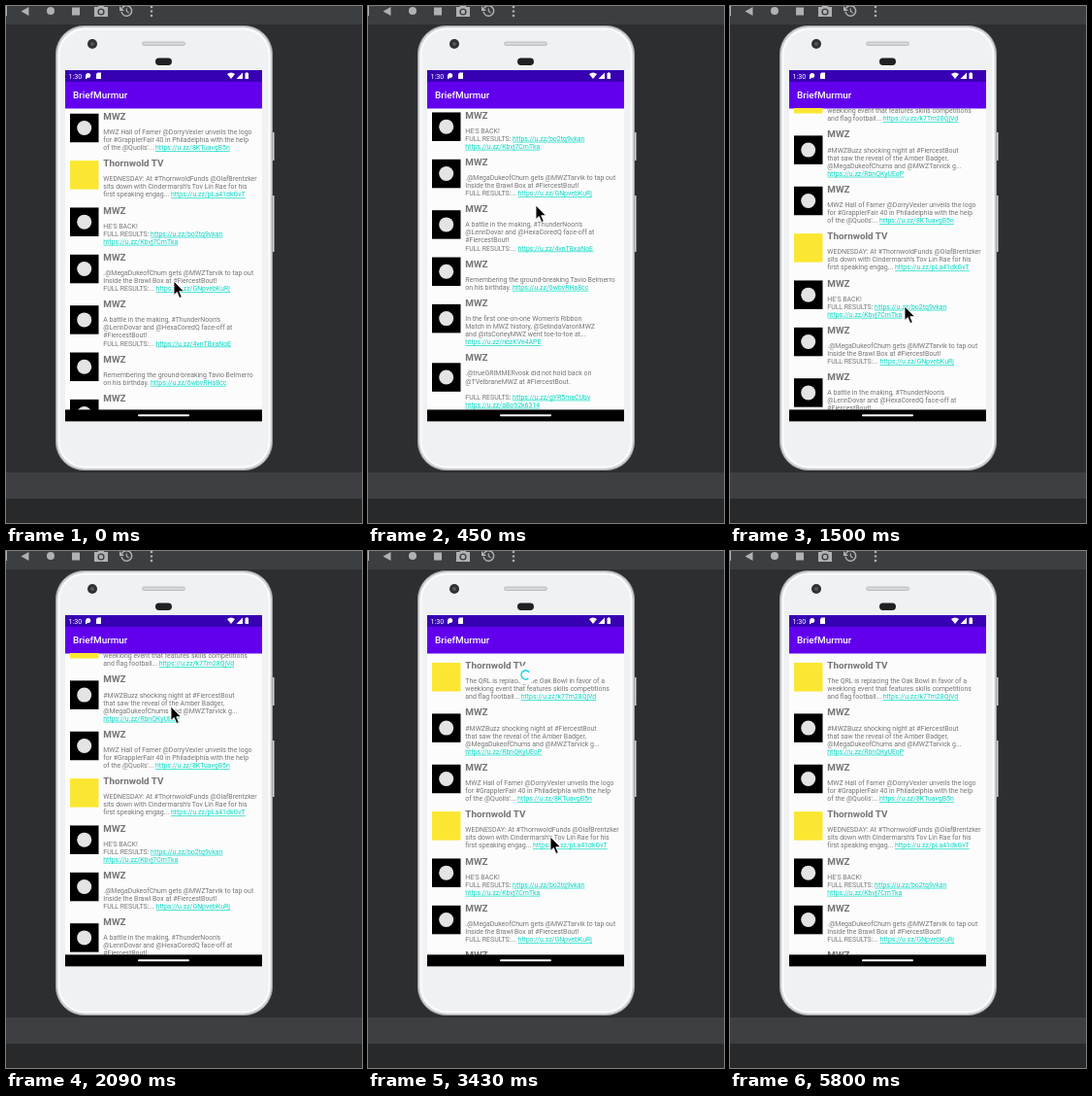
An HTML page for the animation above (6.69 s loop, 367 by 532 pixels).

```html
<!DOCTYPE html>
<html lang="en">
<head>
<meta charset="utf-8">
<title>Feed refresh</title>
<style>
html, body { margin: 0; width: 100%; height: 100%; overflow: hidden; background: #2d2e32; }
#stage { display: block; width: 367px; height: 532px; }
text { font-family: Roboto, "Open Sans", sans-serif; white-space: pre; }
.name { font-size: 9.88px; font-weight: 700; fill: #757575; }
.body { font-size: 6.95px; fill: #757575; }
.link { fill: #03dac5; text-decoration: underline; }
</style>
</head>
<body>
<svg id="stage" viewBox="0 0 367 532">
  <!-- emulator window -->
  <rect width="367" height="532" fill="#2d2e32"/>
  <rect width="367" height="19" fill="#3c3f41"/>
  <rect y="480" width="367" height="27" fill="#3d3f43"/>
  <rect y="507" width="367" height="25" fill="#28292a"/>
  <g fill="#afb1b3">
    <path d="M0 0h1v10H0zM23.500 1v9L15.500 5.500z"/>
    <circle cx="46" cy="5" r="4"/>
    <rect x="68" y="1.500" width="8" height="8"/>
    <path d="M91 1h3.500l1.500-2h4l1.500 2H105v10H91z"/>
    <circle cx="98" cy="6" r="2.900" fill="none" stroke="#3c3f41" stroke-width="1.400"/>
    <circle cx="124.300" cy="5" r="5.300" fill="none" stroke="#afb1b3" stroke-width="1.500" stroke-dasharray="29 5" transform="rotate(-150 124.300 5)"/>
    <path d="M117 0v5h5zM123.700 2.500h1.200v2.500l2 1.500-.7 1-2.500-2z"/>
    <path d="M150 1v0M150 5.500v0M150 10v0" stroke="#afb1b3" stroke-width="2.600" stroke-linecap="round"/>
  </g>

  <!-- phone -->
  <path d="M274 130h2.500v29H274zM274 195h2.500v58H274z" fill="#d4d5d6"/>
  <rect x="51.500" y="20.500" width="223" height="457" rx="29" fill="#d3d4d6" stroke="#9fa1a3"/>
  <rect x="54.500" y="23.500" width="217" height="451" rx="27" fill="#eff1f2" stroke="#fdfdfd" stroke-width="2"/>
  <circle cx="89" cy="39" r="5" fill="#2f3133"/><circle cx="89" cy="39" r="2" fill="#54575a"/>
  <rect x="140.500" y="37" width="44" height="3.500" rx="1.700" fill="#d5d7d8" stroke="#b2b4b6" stroke-width=".8"/>
  <rect x="154" y="53.500" width="17" height="7.500" rx="3.700" fill="#1f2123"/>

  <!-- screen -->
  <rect x="61" y="66" width="203" height="361" fill="#fcfcfc"/>
  <rect x="61" y="66" width="203" height="12" fill="#3700b3"/>
  <rect x="61" y="78" width="203" height="27.500" fill="#6200ee"/>
  <g fill="#fff">
    <text x="64.500" y="74.800" font-size="7.200">1:30</text>
    <circle cx="84.700" cy="71.500" r="2.500"/><path d="M82 71h1.500v4H82z"/>
    <path d="M93 70l1.500-1.500H98V75h-5z"/>
    <path d="M228 70q4-3 8 0l-4 5zM244 68.500V75h-6.500zM246.500 69h1v-.8h1.500v.8h1v6h-3.500z"/>
    <text x="69" y="95.300" font-size="9.880" font-weight="500">BriefMurmur</text>
  </g>

  <svg x="61" y="105" width="203" height="311" viewBox="61 105 203 311">
    <g id="list"></g>
    <g id="spinner">
      <circle cy=".6" r="10.400" fill="#000" opacity=".05"/>
      <circle r="10" fill="#fcfcfc"/>
      <circle id="arc" r="4.500" fill="none" stroke="#03cfe0" stroke-width="1.400" stroke-dasharray="21 7.300"/>
    </g>
  </svg>
  <rect x="61" y="415.400" width="203" height="12" fill="#000"/>
  <rect x="136" y="420.300" width="53" height="2" rx="1" fill="#fff"/>

  <path id="cursor" d="M0 0V14.500L3.300 11.500 5.800 17.500 8.300 16.500 5.800 10.700H10.500Z" fill="#000" stroke="#fff" stroke-width=".9"/>
</svg>

<script>
const $ = id => document.getElementById(id);
const RING = "MWZ", NEWS = "Thornwold TV";
const LOOP = 6690, STEPS = 45, LIST_TOP = 105, LINE = 8.05;

const posts = [
  [NEWS, "The QRL is replacing the Oak Bowl in favor of a",
    "weeklong event that features skills competitions",
    "and flag football... https://u.zz/k7Tm28QjVd"],
  [RING, "#MWZBuzz shocking night at #FiercestBout",
    "that saw the reveal of the Amber Badger,",
    "@MegaDukeofChums and @MWZTarvick g...",
    "https://u.zz/RbnQKyUEoP"],
  [RING, "MWZ Hall of Famer @DorryVexler unveils the logo",
    "for #GrapplerFair 40 in Philadelphia with the help",
    "of the @Quolls'... https://u.zz/8KTuavgB5n"],
  [NEWS, "WEDNESDAY: At #ThornwoldFunds @OlafBrentzker",
    "sits down with Cindermarsh's Tov Lin Rae for his",
    "first speaking engag... https://u.zz/pLa41dkGvT"],
  [RING, "HE'S BACK!",
    "FULL RESULTS: https://u.zz/bo2tq9vkan",
    "https://u.zz/Kbvj7CmTka"],
  [RING, ".@MegaDukeofChum gets @MWZTarvik to tap out",
    "Inside the Brawl Box at #FiercestBout!",
    "FULL RESULTS:... https://u.zz/GNpvebKuRj"],
  [RING, "A battle in the making, #ThunderNoon's",
    "@LennDovar and @HexaCoredQ face-off at",
    "#FiercestBout!",
    "FULL RESULTS:... https://u.zz/4vnTBxaNoE"],
  [RING, "Remembering the ground-breaking Tavio Belmerro",
    "on his birthday. https://u.zz/6wbvRHa8cc"],
  [RING, "In the first one-on-one Women's Ribbon",
    "Match in MWZ history, @SelindaVaronMWZ",
    "and @itsCorleyMWZ went toe-to-toe at...",
    "https://u.zz/nbzKVe4APE"],
  [RING, ".@trueGRIMMERvosk did not hold back on",
    "@TVelbraneMWZ at #FiercestBout.", "",
    "FULL RESULTS: https://u.zz/gYR5maCUbv",
    "https://u.zz/aBo92k6314"]
];

// Stack the posts; mid is the middle of each name line
let mid = 117.7, markup = "";
for (const [name, ...lines] of posts) {
  const isNews = name === NEWS;
  const top = mid - 2.7 + LINE / 2 * (lines.length - 3);
  markup += `<rect x="66" y="${top}" width="29.5" height="29.5" fill="${isNews ? "#fbe731" : "#000"}"/>`;
  if (!isNews) markup += `<circle cx="80.7" cy="${top + 14.7}" r="7.5" fill="#e4e4e4"/>`;
  markup += `<text class="name" x="100.3" y="${mid + 3.4}">${name}</text>`;
  lines.forEach((line, i) => {
    const rich = line.replace(/https\S+/, '<tspan class="link">$&</tspan>');
    markup += `<text class="body" x="100.3" y="${mid + 18.5 + LINE * i}">${rich}</text>`;
  });
  mid += 24.2 + LINE * lines.length;
}
$("list").innerHTML = markup;

const ramp = (k, from, to) => Math.min(1, Math.max(0, (k - from) / (to - from)));
const glide = (k, from, to) => {
  const p = ramp(k, from, to);
  return p * p * (3 - 2 * p);
};
const set = (id, transform) => $(id).setAttribute("transform", transform);

const home = { x: 173, y: 283 };
const gestures = [
  { from: 0, to: 3, x: 173, y: 205 },     // push the list up
  { from: 5, to: 6, x: 170, y: 132 },
  { from: 7, to: 10, x: 180, y: 309 },    // drag it down
  { from: 10, to: 14, x: 170, y: 160 },
  { from: 14, to: 17, x: 191, y: 307 },   // pull to refresh
  { from: 18, to: 22, x: 188, y: 294 },
  { from: 35, to: 39, x: 304, y: 560 }    // leave the stage
];

function pointerAt(k) {
  let { x, y } = home;
  let last = home;
  for (const g of gestures) {
    const p = glide(k, g.from, g.to);
    x += (g.x - last.x) * p;
    y += (g.y - last.y) * p;
    last = g;
  }
  return { x, y };
}

function draw(now) {
  const k = Math.floor((now % LOOP) / LOOP * STEPS);
  const { x, y } = pointerAt(k);

  // the list follows the finger to its top; any further pull brings the spinner
  const pulled = 147 * glide(k, 14, 17);
  const dragged = -109 - 98 * glide(k, 0, 3) + 173 * glide(k, 7, 10);
  const offset = Math.min(0, dragged + pulled);
  const over = Math.max(0, dragged + pulled);
  const stretch = 1 + over * 0.00005 * (1 - glide(k, 18, 22));
  const spinY = 90 + Math.min(37.5, over * 0.5) - 37.5 * glide(k, 31, 33);
  const turn = 240 * (ramp(k, 15, 23) + ramp(k, 25, 33));

  set("cursor", `translate(${x} ${y})`);
  set("list", `translate(0 ${LIST_TOP}) scale(1 ${stretch}) translate(0 ${offset - LIST_TOP})`);
  set("spinner", `translate(162.5 ${spinY})`);
  set("arc", `rotate(${turn - 190})`);
}

let start;
function tick(now) {
  start ??= now;
  draw(now - start);
  requestAnimationFrame(tick);
}
draw(0);
requestAnimationFrame(tick);
</script>
</body>
</html>
```
